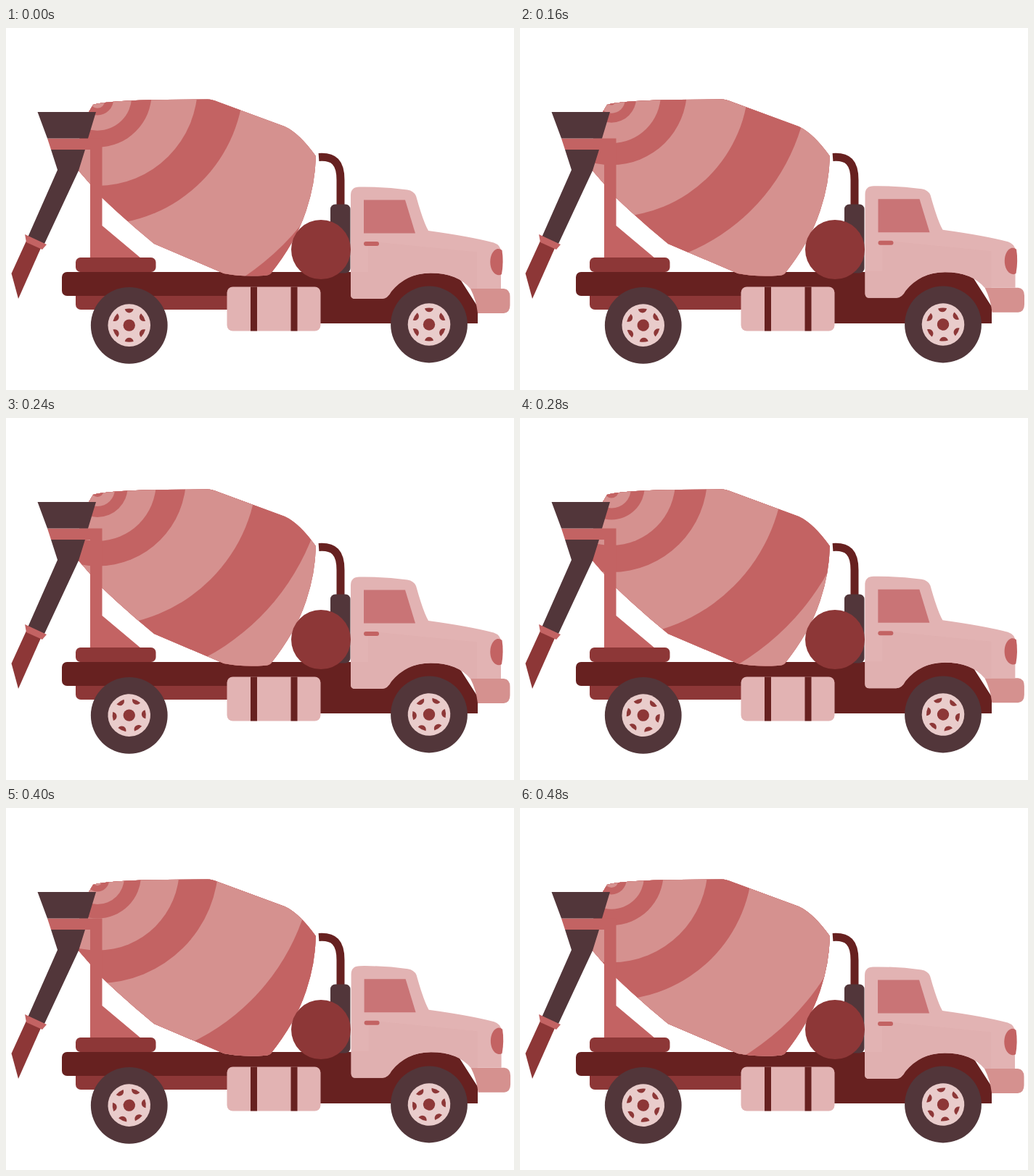
These frames come from a looping animation (700x500 px, 0.52 s). An HTML page:

```html
<!DOCTYPE html>
<html lang="en">
<head>
<meta charset="utf-8">
<title>Concrete mixer</title>
<style>
  html, body { margin: 0; width: 100%; height: 100%; overflow: hidden; background: #fff; }
  svg { display: block; width: 700px; height: 500px; }
  .dark { fill: #672120; }
  .brick { fill: #8d3737; }
  .red { fill: #c36363; }
  .rose { fill: #d5918f; }
  .pale { fill: #e2b3b3; }
  .tyre { fill: #52363a; }
  .hub { fill: #e9cccb; }
  .glass { fill: #c97476; }
</style>
</head>
<body>
<svg viewBox="0 0 700 500">
  <defs>
    <clipPath id="drumShape">
      <path d="M120 106Q140 100 220 99L278 98.5Q284 98.5 292 102L384 136Q404 145 427 177Q426 215 414 251Q400 295 365 339Q362 342 355 342Q325 344 300 339L204 298Q165 266 132 234L100 197Q94 160 114 116Z"/>
    </clipPath>
    <path id="slot" class="brick" d="M-6-22.3A23.5 23.5 0 0 1 6-22.3C4.5-15.5-4.5-15.5-6-22.3Z"/>
    <g id="wheel">
      <circle class="hub" r="29.3"/>
      <circle class="brick" r="8.2"/>
    </g>
  </defs>

  <!-- chassis -->
  <rect class="brick" x="96" y="350" width="240" height="39" rx="7"/>
  <rect class="dark" x="77" y="337" width="420" height="33" rx="7"/>
  <path class="dark" d="M420 337H490V330H615L650 385V408H420Z"/>

  <!-- drum -->
  <g id="drum" clip-path="url(#drumShape)">
    <rect class="rose" x="80" y="90" width="360" height="260"/>
  </g>

  <!-- stand, hopper and chute -->
  <path class="red" d="M57 152.500H132.500V273L186 318H116V168H62Z"/>
  <rect class="brick" x="96" y="317" width="110.500" height="20" rx="6.500"/>
  <path class="tyre" d="M43.500 116H124L113 152.500H57ZM62 168H109L100 197L53 298L30 289L71 196Z"/>
  <path class="brick" d="M28 294L48 304L17 374L7.500 339Z"/>
  <path class="red" d="M26 285L56 299L50 306L28 296Z"/>

  <!-- exhaust and tanks -->
  <path d="M431 178.500C452 177 461 186 461 210V246" fill="none" stroke="#672120" stroke-width="11"/>
  <rect class="tyre" x="447" y="243.500" width="27.500" height="95" rx="6.500"/>
  <circle class="brick" cx="434" cy="306" r="41"/>
  <rect class="pale" x="304.500" y="357.500" width="129" height="61" rx="8"/>
  <path class="dark" d="M337 357.500H346V418.500H337ZM392.500 357.500H401.500V418.500H392.500Z"/>

  <g id="cab">
    <path class="rose" d="M640 360H686Q694.500 361 694.500 371V383Q694.500 393 686 394H650Q648 376 640 360Z"/>
    <path class="pale" d="M475 231Q475 219.500 487 219.500Q520 219 553 223.500Q562 225 565 232Q575 268 582 280Q640 288 672 296.500Q682 300 682 309V360H640Q622 338.500 585 338.500Q552 338.500 531 364Q526 374 518 374H481Q475 374 475 368Z"/>
    <path d="M514 296L649 309.500V360H640Q622 338.500 585 338.500Q548 339 529 366Q522 374 518 374H481Q475 374 475 368V337H499V302H510Q514 301 514 296Z" fill="#e0b0b0"/>
    <path class="glass" d="M493 237.500H550L564 283.500H493Z"/>
    <rect class="red" x="493" y="295" width="21" height="6" rx="3"/>
    <path class="red" d="M677 305Q681 304.500 683.500 307Q686 323 683 340Q681 342 677 341C664 337 664 309 677 305Z"/>
  </g>

  <circle class="tyre" cx="169.750" cy="410.800" r="52.900"/>
  <circle class="tyre" cx="583" cy="409.500" r="52.900"/>
  <use class="spin" href="#wheel" data-at="169.750 410.600"/>
  <use class="spin" href="#wheel" data-at="583 409.500"/>
</svg>
<script>
const LOOP = 520, STEP = 40, TURN = 500;
const byId = id => document.getElementById(id);

function add(parent, tag, attrs) {
  const el = document.createElementNS("http://www.w3.org/2000/svg", tag);
  for (const name in attrs) el.setAttribute(name, attrs[name]);
  return parent.appendChild(el);
}

for (let i = 0; i < 6; i++)
  add(byId("wheel"), "use", { href: "#slot", transform: `rotate(${i * 60})` });

// Nested discs, largest first: each pair leaves one stripe.
const discs = [];
for (let ring = 1; ring >= -3; ring--) {
  for (const [size, growth, color] of [[217, 2.42, "red"], [153, 2.46, "rose"]])
    discs.push({ ring, size, growth, el: add(byId("drum"), "circle", { class: color, cx: 126 }) });
}
const wheels = document.querySelectorAll(".spin");

function bounce(phase) {
  const x = phase < 0.3 ? phase / 0.3 : (1 - phase) / 0.7;
  return (1 - Math.cos(Math.PI * x)) / 2;
}

function draw(now) {
  const turn = Math.floor((now % LOOP) / STEP) * STEP / TURN;
  for (const { ring, size, growth, el } of discs) {
    const r = Math.max(0, size * growth ** (ring + turn) - 15);
    el.setAttribute("r", r);
    el.setAttribute("cy", 102 - 0.16 * r);
  }
  for (const wheel of wheels)
    wheel.setAttribute("transform", `translate(${wheel.dataset.at}) rotate(${180 * turn})`);
  const lift = bounce(turn * 2 % 1);
  byId("cab").setAttribute("transform", `translate(${lift} ${-2.2 * lift})`);
}

const start = performance.now();
function tick() {
  draw(performance.now() - start);
  requestAnimationFrame(tick);
}
tick();
</script>
</body>
</html>
```
